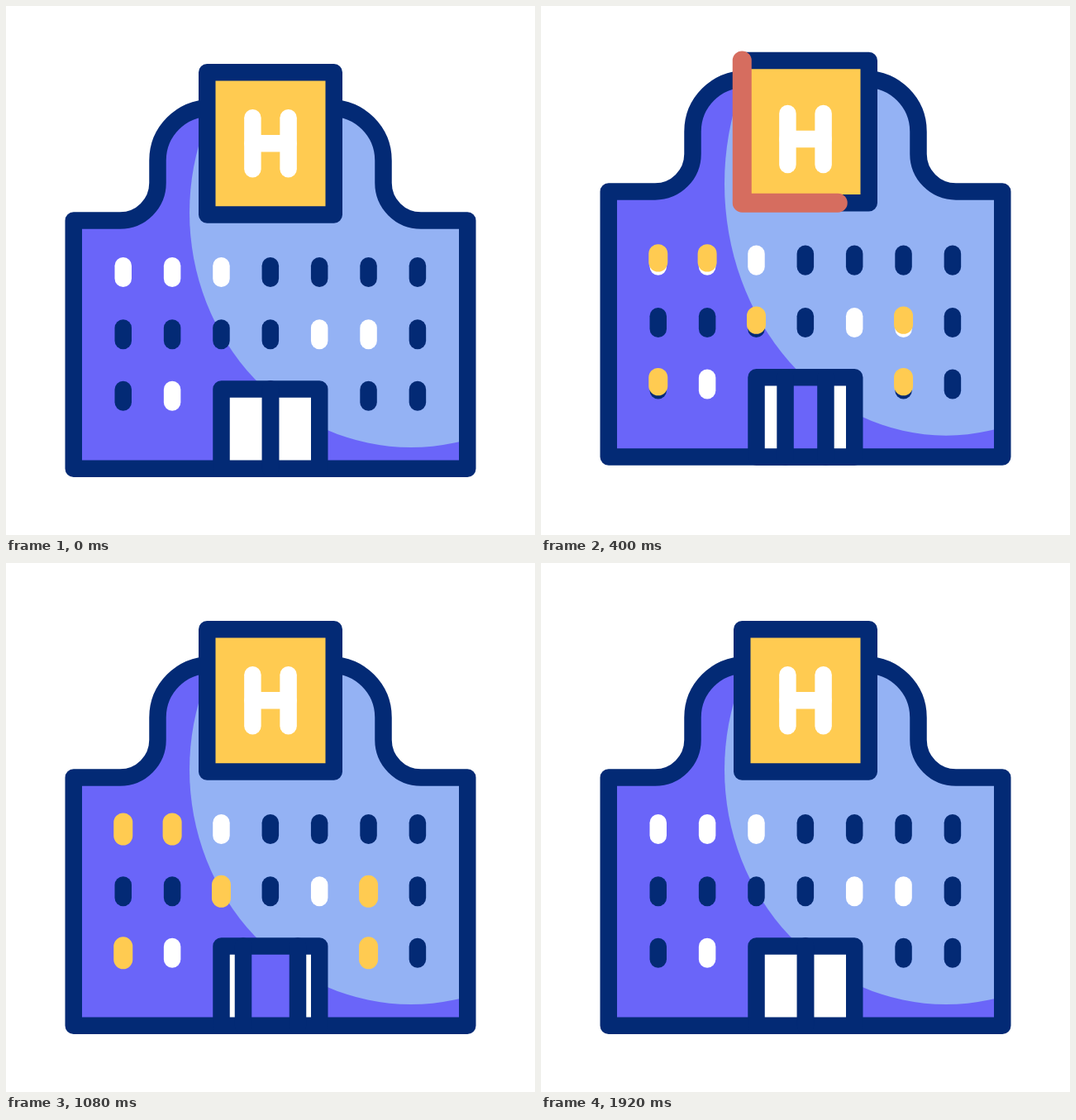
An HTML page with a canvas for the animation above (2000 ms loop, 640 by 640 pixels).

```html
<!DOCTYPE html>
<html lang="en">
<head>
<meta charset="utf-8">
<title>Hospital</title>
<style>
  html, body { margin: 0; width: 100%; height: 100%; overflow: hidden; background: #fff; }
  canvas { display: block; width: 100vw; height: 100vh; }
</style>
</head>
<body>
<canvas id="stage" width="640" height="640"></canvas>
<script>
const ctx = document.getElementById('stage').getContext('2d');
const LOOP = 2000, STEP = 40, LINE = 20.5, BOLD = 23;
const NAVY = '#032a75', PURPLE = '#6a65f9', BLUE = '#94b2f4',
      YELLOW = '#ffcb51', RED = '#d66d5f', WHITE = '#fff';

// Keyframes are [time, value] pairs, eased in and out between neighbours.
function tween(t, keys) {
  if (t <= keys[0][0]) return keys[0][1];
  for (let i = 1; i < keys.length; i++) {
    const [t0, a] = keys[i - 1], [t1, b] = keys[i];
    if (t < t1) {
      const s = (t - t0) / (t1 - t0);
      return a + (b - a) * s * s * (3 - 2 * s);
    }
  }
  return keys[keys.length - 1][1];
}

const jumpKeys = [[160, 0], [360, -17], [520, 0]];
const roofKeys = [[160, 0], [360, -25], [560, 16.3], [760, 0]];
const letterKeys = [[160, 0], [480, 10.8], [760, -9], [1080, 0]];
const doorKeys = [[160, 0], [520, 33], [1440, 33], [1920, 0]];
const traceEndKeys = [[160, 0], [680, 1]];
const traceStartKeys = [[440, 0], [1040, 1]];
const lightKeys = [[280, 0], [480, 1], [1320, 1], [1520, 0]];

// n: navy, w: white, -: none; capitals light up yellow.
const windowRows = [[322, 'WWwnnnn'], [397.3, 'nnNnwWn'], [471.8, 'Nw---Nn']];

function stroke(color, width, path) {
  ctx.strokeStyle = color;
  ctx.lineWidth = width;
  ctx.stroke(path);
}

function line(color, width, ...points) {
  const path = new Path2D();
  points.forEach(([x, y]) => path.lineTo(x, y));
  stroke(color, width, path);
}

function rect(color, x0, y0, x1, y1) {
  ctx.fillStyle = color;
  ctx.fillRect(x0, y0, x1 - x0, y1 - y0);
}

function drawBody(roof) {
  const body = new Path2D(
    `M81.75 559.75V${259.5 + roof}H138a45.5 45.5 0 0 0 45.5 -45.5v-27` +
    `a63.5 63.5 0 0 1 63.5 -63.5H393a63.5 63.5 0 0 1 63.5 63.5v27` +
    `a45.5 45.5 0 0 0 45.5 45.5H558.25V559.75Z`);
  ctx.fillStyle = PURPLE;
  ctx.fill(body);

  ctx.save();
  ctx.clip(body);
  const centerY = 250 + roof;
  ctx.fillStyle = BLUE;
  ctx.beginPath();
  ctx.ellipse(490, centerY, 268, 534 - centerY, 0, 0, 2 * Math.PI);
  ctx.fill();
  ctx.restore();
  stroke(NAVY, LINE, body);
}

function drawWindows(light) {
  for (const [y, row] of windowRows) {
    [...row].forEach((kind, i) => {
      if (kind === '-') return;
      const x = 141.75 + 59.36 * i;
      line(kind.toLowerCase() === 'w' ? WHITE : NAVY, LINE, [x, y - 7.8], [x, y + 7.8]);
      if (light > 0 && kind !== kind.toLowerCase())
        line(YELLOW, BOLD, [x, y - 8], [x, y - 8 + 16 * light]);
    });
  }
}

function drawDoor(open) {
  const left = 260.5, right = 379.25, top = 463.5, bottom = 559.75;
  rect(PURPLE, left, top, right, bottom);
  rect(WHITE, left, top, 320 - open, bottom);
  rect(WHITE, 320 + open, top, right, bottom);
  line(NAVY, LINE, [left, bottom], [left, top], [right, top], [right, bottom], [left, bottom]);
  for (const x of [320 - open, 320 + open]) line(NAVY, LINE, [x, top], [x, bottom]);
}

function drawSign(letterShift, start, end) {
  const left = 243.25, right = 396.75, top = 80.25, bottom = 252.5;
  const frame = new Path2D(`M${left} ${top}V${bottom}H${right}V${top}H${left}`);
  rect(YELLOW, left, top, right, bottom);
  const outline = new Path2D(frame);
  outline.closePath();
  stroke(NAVY, LINE, outline);

  const y = 166.2 + letterShift;
  for (const x of [298.4, 341.6]) line(WHITE, LINE, [x, y - 31], [x, y + 31]);
  line(WHITE, LINE, [298.4, y], [341.6, y]);

  if (end > start) {
    const length = 2 * (right - left + bottom - top);
    ctx.setLineDash([(end - start) * length, 2 * length]);
    ctx.lineDashOffset = -start * length;
    stroke(RED, BOLD, frame);
    ctx.setLineDash([]);
  }
}

function draw(t) {
  ctx.clearRect(0, 0, 640, 640);
  ctx.lineCap = ctx.lineJoin = 'round';
  ctx.save();
  ctx.translate(0, tween(t, jumpKeys));
  drawBody(tween(t, roofKeys));
  drawWindows(tween(t, lightKeys));
  drawDoor(tween(t, doorKeys));
  drawSign(tween(t, letterKeys), tween(t, traceStartKeys), tween(t, traceEndKeys));
  ctx.restore();
}

const startTime = performance.now();
function tick() {
  const t = (performance.now() - startTime) % LOOP;
  draw(Math.floor(t / STEP) * STEP);
  requestAnimationFrame(tick);
}
tick();
</script>
</body>
</html>
```
